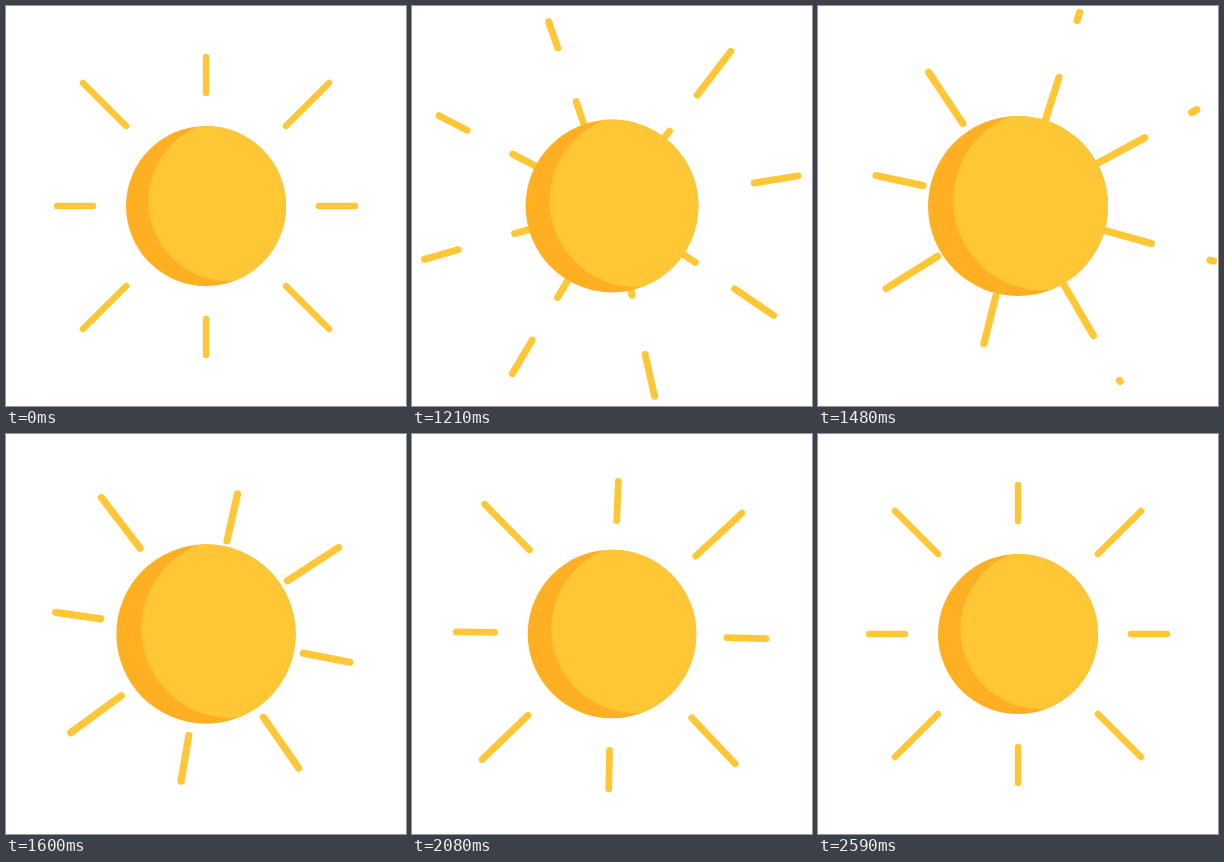
An HTML page with a canvas for the animation above (2.62 s loop, 400 px wide and 400 px high).

```html
<!DOCTYPE html>
<html lang="en">
<head>
<meta charset="utf-8">
<title>Sun</title>
<style>
  html, body { margin: 0; width: 100%; height: 100%; overflow: hidden; background: #fff; }
  canvas { display: block; width: 400px; height: 400px; }
</style>
</head>
<body>
<canvas id="stage" width="400" height="400"></canvas>
<script>
const ctx = document.getElementById('stage').getContext('2d');
const LOOP = 2620, HOLD = 1030, STEP = 30;
const LIGHT = '#ffc636', DARK = '#ffaf22';
const RADIUS = 80, RAY_START = 113, TRAVEL = 99, RAY_LIMIT = 180.5;
const SHORT = 36, LONG = 61;

const clamp = x => Math.min(1, Math.max(0, x));
const mix = (a, b, p) => a + (b - a) * p;

// Cubic bezier easing (.09, 0, .1, 1), solved by bisection.
function ease(x) {
  if (x <= 0 || x >= 1) return clamp(x);
  let lo = 0, hi = 1;
  for (let i = 0; i < 30; i++) {
    const s = (lo + hi) / 2, r = 1 - s;
    if (3 * s * r * r * 0.09 + 3 * s * s * r * 0.1 + s ** 3 < x) lo = s;
    else hi = s;
  }
  return lo * lo * (3 - 2 * lo);
}

function pulse(t) {
  const swell = t < 1465
    ? Math.sin(clamp((t - 1005) / 460) * Math.PI / 2)
    : (1 + Math.cos(clamp((t - 1465) / 1130) * Math.PI)) / 2;
  return 1 + 0.125 * swell;
}

function disc(x, y, color) {
  ctx.beginPath();
  ctx.arc(x, y, RADIUS, 0, Math.PI * 2);
  ctx.fillStyle = color;
  ctx.fill();
}

function segment(from, to) {
  if (from >= RAY_LIMIT) return;
  ctx.beginPath();
  ctx.moveTo(from, 0);
  ctx.lineTo(Math.min(to, RAY_LIMIT), 0);
  ctx.stroke();
}

// Each ray slides outwards while its successor emerges from behind the disc.
function ray(k, t) {
  const p = ease((t - 1005 - 14.7 * k) / (1286 + 22.8 * k));
  const length = k % 2 ? mix(LONG, SHORT, p) : mix(SHORT, LONG, p);
  const outer = RAY_START + TRAVEL * p, inner = outer - TRAVEL;
  ctx.save();
  ctx.rotate(-Math.PI / 2 - (k + p) * Math.PI / 4);
  segment(inner, inner + length);
  segment(outer, outer + length);
  ctx.restore();
}

function draw(time) {
  const t = time < HOLD ? 0 : HOLD + STEP * Math.floor((time - HOLD) / STEP);
  ctx.setTransform(1, 0, 0, 1, 0, 0);
  ctx.fillStyle = '#fff';
  ctx.fillRect(0, 0, 400, 400);
  ctx.translate(200, 200);
  const scale = pulse(t);
  ctx.scale(scale, scale);

  ctx.strokeStyle = LIGHT;
  ctx.lineWidth = 6.4;
  ctx.lineCap = 'round';
  for (let k = 0; k < 8; k++) ray(k, t);

  disc(0, 0, DARK);
  ctx.save();
  ctx.beginPath();
  ctx.arc(0, 0, RADIUS, 0, Math.PI * 2);
  ctx.clip();
  disc(22.3, -5, LIGHT);
  ctx.restore();
}

const origin = performance.now();
function tick() {
  draw((performance.now() - origin) % LOOP);
  requestAnimationFrame(tick);
}
tick();
</script>
</body>
</html>
```
